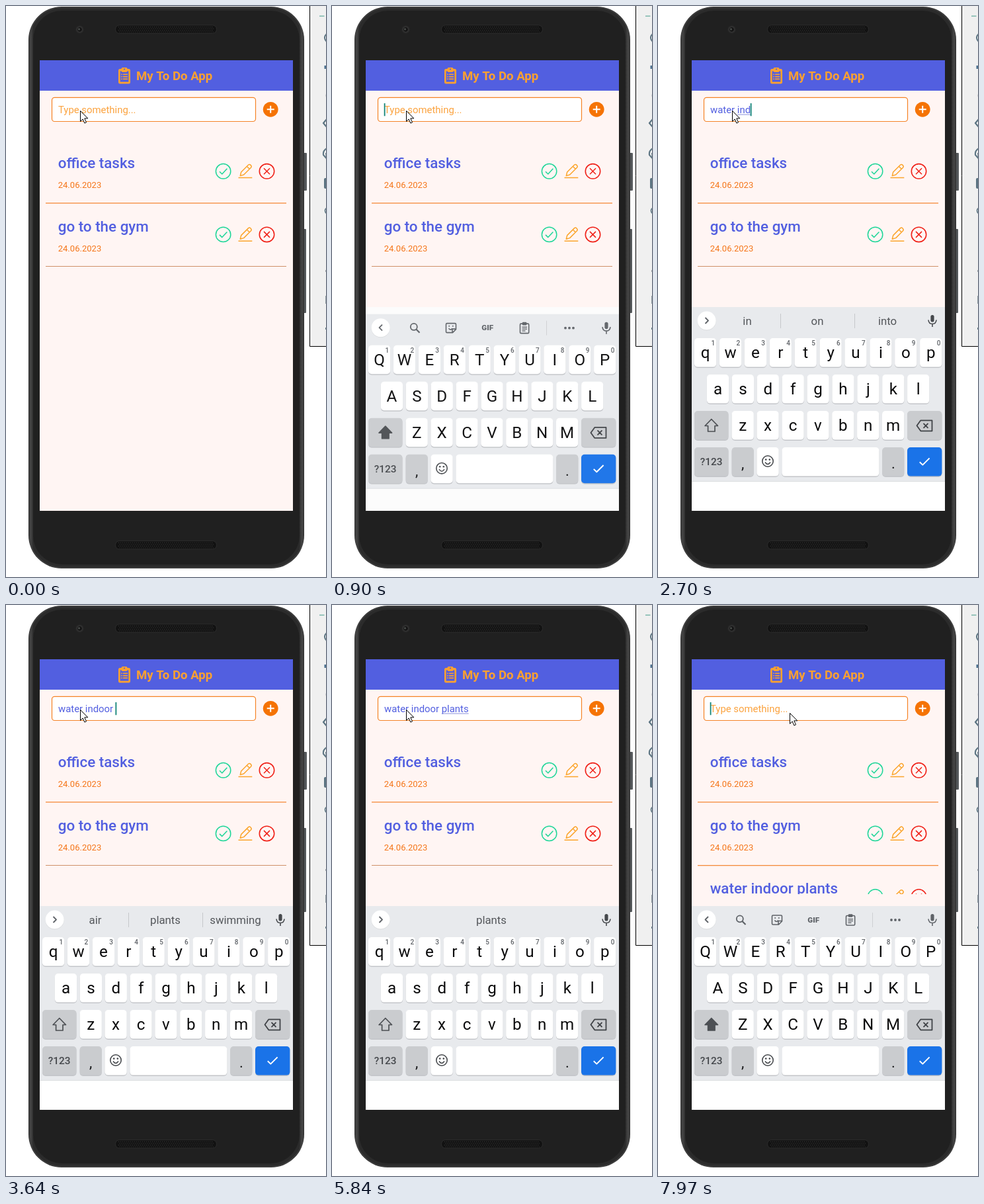
These frames come from a looping animation (484 px wide and 863 px high, 8000 ms). An HTML page with a canvas:

```html
<!DOCTYPE html>
<html lang="en">
<head>
<meta charset="utf-8">
<title>To do app</title>
<style>
html, body { margin: 0; width: 100%; height: 100%; overflow: hidden; background: #fff; }
canvas { display: block; width: 484px; height: 863px; }
</style>
</head>
<body>
<canvas id="stage"></canvas>
<script>
const W = 484, H = 863, LOOP = 8000, STEP = 200 / 3;
const cv = document.getElementById('stage');
const dpr = window.devicePixelRatio || 1;
cv.width = W * dpr;
cv.height = H * dpr;
const c = cv.getContext('2d');

const ORANGE = '#f5761a', AMBER = '#fca130', BLUE = '#525fe0', GREY = '#5f6368';
const PITCH = 37.9, KEY_W = 33.2;
const SCREEN = [51, 82, 383, 681];

// Underscores mark the word being composed.
const TYPING = [
  [0, ''],
  [1170, '_w_'],
  [1440, '_wat_'],
  [1570, '_wate_'],
  [1700, '_water_'],
  [1840, '_water_ '],
  [2040, 'water '],
  [2240, 'water i'],
  [2440, 'water _i_'],
  [2640, 'water _in_'],
  [2700, 'water _ind_'],
  [2970, 'water _indo_'],
  [3100, 'water _indoo_'],
  [3240, 'water _indoor_'],
  [3440, 'water _indoor_ '],
  [3640, 'water indoor '],
  [3700, 'water indoor _p_'],
  [3970, 'water indoor _pl_'],
  [4100, 'water indoor _pla_'],
  [4300, 'water indoor _plan_'],
  [4370, 'water indoor _plan_t'],
  [4570, 'water indoor _plant_'],
  [5100, 'water indoor _plant_s'],
  [5300, 'water indoor _plants_'],
  [7500, '']
];
const HINTS = [
  [0, ''],
  [1300, 'w,we,what'],
  [1500, 'wat,what,water'],
  [1770, 'water,waters,watering'],
  [2040, 'and,is,bottle'],
  [2440, 'I,in,is'],
  [2640, 'in,on,into'],
  [2900, 'ind,index,indoor'],
  [3170, 'indo,indoor,indoors'],
  [3300, 'indoor,indoors,outdoor'],
  [3640, 'air,plants,swimming'],
  [3900, 'p,play,plants'],
  [4300, 'plan,play,planning'],
  [4570, 'plant,plants,planted'],
  [5300, ',plants,'],
  [7570, '']
];
const MOUSE = [
  [6170, 112, 158], [6370, 125, 161], [6500, 125, 161], [6637, 172, 163],
  [6770, 261, 162], [6900, 350, 164], [7037, 398, 162], [7103, 411, 161],
  [7303, 402, 158], [7570, 402, 158], [7703, 350, 162], [7837, 252, 164], [7970, 199, 163]
];
const CARET_OFF = [[0, 500], [5040, 5100], [5840, 6370], [6840, 7360]];

const last = (list, t) => list.filter(e => e[0] <= t).pop()[1];

function mouseAt(t) {
  if (t <= MOUSE[0][0]) return MOUSE[0].slice(1);
  for (let i = 1; i < MOUSE.length; i++) {
    const [a, x0, y0] = MOUSE[i - 1], [b, x1, y1] = MOUSE[i];
    if (t <= b) {
      const k = (t - a) / (b - a);
      return [x0 + (x1 - x0) * k, y0 + (y1 - y0) * k];
    }
  }
  return MOUSE[MOUSE.length - 1].slice(1);
}

function rect(x, y, w, h, fill) {
  c.fillStyle = fill;
  c.fillRect(x, y, w, h);
}
function box(x, y, w, h, r, fill, line, lw = 1) {
  c.beginPath();
  c.roundRect(x, y, w, h, r);
  if (fill) { c.fillStyle = fill; c.fill(); }
  if (line) { c.strokeStyle = line; c.lineWidth = lw; c.stroke(); }
}
function disc(x, y, r, fill, line, lw = 1) {
  c.beginPath();
  c.arc(x, y, r, 0, 7);
  if (fill) { c.fillStyle = fill; c.fill(); }
  if (line) { c.strokeStyle = line; c.lineWidth = lw; c.stroke(); }
}
function path(d, line, lw, fill) {
  const p = new Path2D(d);
  if (fill) { c.fillStyle = fill; c.fill(p); }
  if (line) { c.strokeStyle = line; c.lineWidth = lw; c.stroke(p); }
}
function text(s, x, y, size, color, weight = 400, align = 'left') {
  c.font = `${weight} ${size}px Roboto, sans-serif`;
  c.fillStyle = color;
  c.textAlign = align;
  c.fillText(s, x, y);
}
function at(x, y, draw) {
  c.save();
  c.translate(x, y);
  draw();
  c.restore();
}

function grille(y) {
  box(165.5, y, 153, 12.5, 6, '#121212', '#2c2c2c');
  for (let r = 0; r < 4; r++)
    for (let i = 0; i < 48; i++)
      rect(170 + i * 3 + (r % 2) * 1.5, y + 2 + r * 2.6, 1.3, 1.3, '#303030');
}

function phone() {
  box(449, 222, 6, 57, 1, '#55595b');
  box(449, 337, 5, 127, 1, '#55595b');
  const g = c.createLinearGradient(34, 0, 451, 0);
  [[0, '#262626'], [.008, '#464646'], [.018, '#2b2b2b'], [.982, '#2b2b2b'], [.992, '#464646'], [1, '#262626']]
    .forEach(s => g.addColorStop(...s));
  box(34, 1, 417, 849, 50, g);
  box(35.5, 2.5, 414, 846, 48, null, '#434343', 1.2);
  box(41, 7, 403, 837, 44, '#202020');
  grille(29);
  grille(808.5);
  disc(111.5, 35.5, 6, '#2a2a2a');
  disc(111.5, 35.5, 4, '#151515', '#3b3b3b');
  disc(110.5, 35, 1.5, '#4b4f4c');
}

function sidePanel() {
  box(459.5, -2, 60, 516.5, 0, '#f0f0f0', '#000');
  const ink = '#5b7482';
  rect(474, 14.5, 7.5, 1.6, '#80b9ad');
  path('M485 42Q479 48 485 54', ink, 2);
  rect(481.5, 90, 3, 5, '#4d7190');
  path('M485 131Q482.5 135 485 140', '#b7bcc0', 1);
  path('M485 171L480 177L485 183', ink, 2.2);
  path('M485 215Q479 219 480 225L485 231M484 222L485 233', ink, 2);
  box(481, 260, 8, 16, 2, ink);
  path('M485 305Q480 309 485 314', ink, 1.7);
  rect(483, 399, 1, 3, '#9aa1a5');
  rect(483, 438, 1, 12, '#8c999f');
  rect(483, 486, 1, 3, ink);
}

function header() {
  rect(51, 82, 383, 46, BLUE);
  box(170, 95, 18, 22.5, 2.5, AMBER);
  rect(172.7, 98.5, 12.6, 16.2, BLUE);
  box(174.5, 93, 9, 7, 2, AMBER);
  disc(179, 95.5, 1.1, BLUE);
  [102.5, 106, 109.5].forEach(y => {
    rect(174.2, y, 1.7, 1.7, AMBER);
    rect(177, y, 7, 1.7, AMBER);
  });
  text('My To Do App', 197, 112.3, 18.6, AMBER, 700);
}

function item(title, i) {
  at(0, i * 95.6, () => {
    text(title, 78.7, 245.2, 22.4, BLUE, 500);
    text('24.06.2023', 78.7, 275.2, 13.05, ORANGE);
    disc(328.6, 249.8, 11.2, null, '#1ed698', 1.5);
    path('M323 250.3L326.8 254L334.4 245.8', '#1ed698', 1.5);
    path('M354.3 256.6L355.7 251L366.7 240Q368.3 238.7 370.2 240.6Q372 242.5 370.5 244.2L359.7 255Z' +
      'M364.4 242.4L368.2 246.3M351.5 259.6H372.3', '#fba52c', 1.5);
    disc(394.5, 249.8, 11.2, null, '#f0231a', 1.6);
    path('M390 245.3L399 254.3M399 245.3L390 254.3', '#f0231a', 1.5);
  });
}

function list(open, added) {
  c.save();
  c.beginPath();
  c.rect(51, 190, 383, open ? 247 : 573);
  c.clip();
  item('office tasks', 0);
  item('go to the gym', 1);
  rect(60, 297.3, 364, 1.3, '#f58a3a');
  rect(60, 393, 364, added ? 1.3 : 1, added ? '#f58a3a' : '#cf9068');
  if (added) item('water indoor plants', 2);
  c.restore();
}

function field(t) {
  box(69.5, 138.3, 308, 36.2, 4, '#fff', '#f58327', 1.2);
  const typed = last(TYPING, t);
  let x = 79;
  if (typed) {
    typed.split('_').forEach((part, i) => {
      text(part, x, 162, 14.9, BLUE);
      const w = c.measureText(part).width;
      if (i === 1) rect(x, 163.6, w, 1, '#8990dc');
      x += w;
    });
  } else {
    text('Type something...', x, 162, 14.9, '#fba33f');
  }
  if (!CARET_OFF.some(([a, b]) => t >= a && t < b)) rect(x - .3, 147, 1.8, 19.3, '#128477');

  c.globalAlpha = t >= 7340 && t < 7440 ? .5 : 1;
  disc(400.2, 156.3, 11.4, '#f57304');
  c.globalAlpha = 1;
  path('M394.7 156.3H405.7M400.2 150.8V161.8', '#fff', 2);
}

function key(x, y, w, fill = '#fff') {
  box(x, y + 1, w, 44, 5, '#c3c5c9');
  box(x, y, w, 43.6, 5, fill);
}

function mic(color) {
  box(412.4, 467, 5.2, 10.5, 2.6, color);
  path('M409 474.5Q409.5 480.5 415 480.5Q420.5 480.5 421 474.5M415 480.5V485', color, 1.6);
}

function toolbar() {
  disc(123.8, 474.3, 5, null, GREY, 1.8);
  path('M127.5 478L132.5 483', GREY, 2.2);
  path('M174 469H186Q187.5 469 187.5 470.5V478L182.5 483H174Q172.5 483 172.5 481.5V470.5Q172.5 469 174 469Z' +
    'M187.5 477.5H182V483M176.5 476.5Q179 480.5 182 476.5', GREY, 1.6);
  disc(177.2, 473, 1, GREY);
  disc(182.8, 473, 1, GREY);
  text('GIF', 235.2, 479.8, 11.6, GREY, 900, 'center');
  box(284.5, 469.5, 13.2, 14.5, 1.5, null, GREY, 1.6);
  box(287.8, 467.2, 6.6, 4.6, 1.2, GREY);
  rect(287.5, 474, 7.5, 1.4, GREY);
  rect(287.5, 476.8, 7.5, 1.4, GREY);
  rect(287.5, 479.6, 5, 1.4, GREY);
  rect(324, 465, 1, 22, '#cfd1d4');
  [353, 359, 365].forEach(x => disc(x, 476, 1.9, GREY));
}

function hints(words) {
  words.forEach((w, i) => text(w, 135 + i * 106, 482, 16.8, '#54575b', 400, 'center'));
  if (words[0]) [185, 297].forEach(x => rect(x, 465, 1, 22, '#c6c8cb'));
}

function keyboard(t) {
  const upper = t < 1170 || t >= 7570;
  const words = last(HINTS, t);
  const dark = '#cacccf';
  rect(51, 455, 383, 263.5, '#e8eaed');
  rect(51, 718, 383, 1, '#dcdee0');

  disc(73.6, 476.4, 14, '#d6d8da');
  disc(73.6, 475.6, 14, '#fff');
  path(upper ? 'M76 471L71.5 475.5L76 480' : 'M71.5 471L76 475.5L71.5 480', GREY, 1.8);
  if (words) hints(words.split(','));
  else if (upper) toolbar();
  mic(upper ? GREY : '#45484c');

  ['QWERTYUIOP', 'ASDFGHJKL', 'ZXCVBNM'].forEach((row, r) => {
    const x0 = [55, 73.9, 111.6][r], y = 502 + r * 55;
    [...row].forEach((ch, i) => {
      const x = x0 + i * PITCH, mid = x + KEY_W / 2;
      key(x, y, KEY_W);
      text(upper ? ch : ch.toLowerCase(), mid, y + 30.4, 24.2, '#0b0b0c', 400, 'center');
      if (r === 0) text((i + 1) % 10, mid + 11.8, y + 11, 10, GREY, 500, 'center');
    });
  });

  key(55, 612, 51.5, dark);
  path('M80.8 624.5L90.5 634.5H86V643H75.6V634.5H71.1Z', '#4d5054', 1.7, upper ? '#4d5054' : null);
  key(377, 612, 52.4, dark);
  path('M391.5 634.3L397.3 626.3H414.5V642.3H397.3ZM401.5 630.8L408.5 637.8M408.5 630.8L401.5 637.8', '#3f4246', 1.8);

  key(55, 667, 51.5, dark);
  text('?123', 80.7, 694.3, 15.4, '#45484c', 500, 'center');
  key(111.6, 667, KEY_W, dark);
  text(',', 128.2, 699, 22, '#17181a', 400, 'center');
  key(149.5, 667, KEY_W);
  disc(166, 688, 8.2, null, '#45484c', 1.6);
  disc(163.2, 685.6, 1.3, '#45484c');
  disc(168.8, 685.6, 1.3, '#45484c');
  path('M162 689.5Q166 695.5 170 689.5', '#45484c', 1.5);
  key(187.4, 667, 147);
  key(339.2, 667, KEY_W, dark);
  text('.', 355.8, 699, 22, '#17181a', 400, 'center');
  key(377, 667, 52.4, '#1a73e8');
  path('M395.8 689.2L400.3 693.6L410.6 683.4', '#fff', 2);
}

function pointer(x, y) {
  at(x + .5, y + .5, () => {
    c.lineJoin = 'miter';
    path('M0 0V16L3.7 12.5L6.4 18.6L9 17.4L6.3 11.4H11.3Z', '#000', 1, '#fff');
  });
}

function draw(t) {
  const k = Math.max(0, Math.floor((t - 30) / STEP));
  const tq = 36.67 + k * STEP;
  const open = t >= 770;
  const slide = open ? 96 * Math.pow(Math.max(0, 1 - (tq - 770) / 200), 2) : 0;

  c.setTransform(dpr, 0, 0, dpr, 0, 0);
  c.lineJoin = 'round';
  c.textBaseline = 'alphabetic';
  rect(0, 0, W, H, '#fff');
  sidePanel();
  phone();

  c.save();
  c.beginPath();
  c.rect(...SCREEN);
  c.clip();
  rect(...SCREEN, '#fff5f3');
  header();
  field(t);
  list(open, t >= 7500);
  if (open) {
    rect(51, 455, 383, 308, slide > 1 ? '#fcfcfc' : '#fff');
    if (slide > 1) {
      // Fade the keyboard in as one layer by veiling it.
      at(0, slide, () => keyboard(t));
      rect(51, 455 + slide, 383, 308 - slide, `rgba(252,252,252,${Math.min(.27, slide / 350)})`);
    } else {
      keyboard(t);
    }
  }
  c.restore();
  pointer(...mouseAt(tq).map(Math.round));
}

const start = performance.now();
function tick() {
  draw((performance.now() - start) % LOOP);
  requestAnimationFrame(tick);
}
tick();
</script>
</body>
</html>
```
